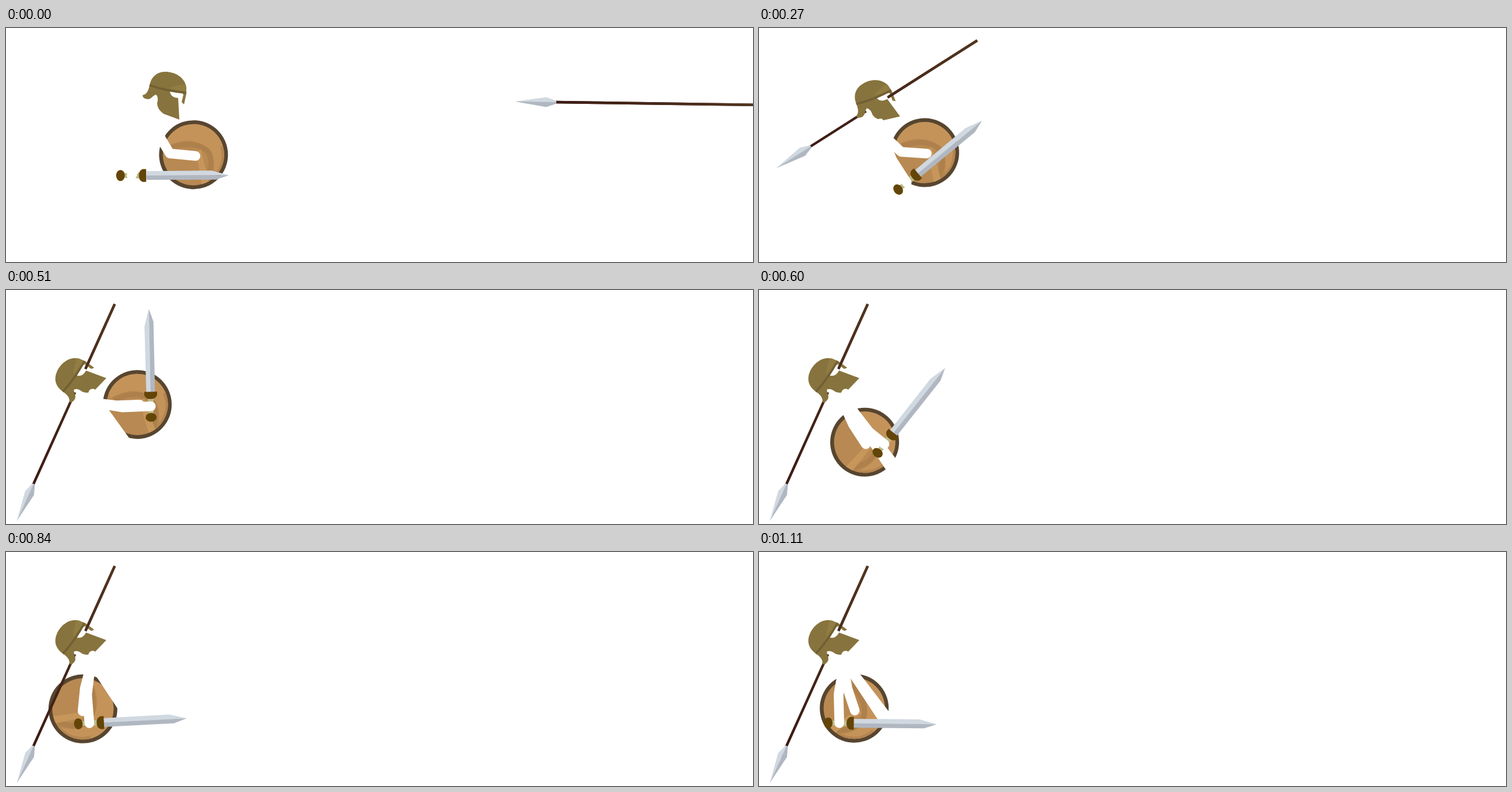
Recreate the animation shown at these times as an HTML page with a canvas. Size 1280x401 px, loop 1.14 s.

```html
<!DOCTYPE html>
<html lang="en">
<head>
<meta charset="utf-8">
<title>Spear</title>
<style>
  html, body { margin: 0; width: 100%; height: 100%; overflow: hidden; background: #fff; }
  canvas { display: block; }
</style>
</head>
<body>
<canvas id="stage" width="1280" height="401"></canvas>
<script>
const ctx = document.getElementById('stage').getContext('2d');
const LOOP = 1140, STEP = 30;
const HIT = 120, FALLEN = 420, SETTLED = 540;
const RAD = Math.PI / 180;

const mix = (a, b, u) => a + (b - a) * u;
const progress = (t, from, to) => Math.min(1, Math.max(0, (t - from) / (to - from)));

// Pendulum: eases through its turning points.
function swing(t, times, angles) {
  return angles.reduce((angle, next, i) => {
    const u = i ? progress(t, times[i - 1], times[i]) : 1;
    return mix(angle, next, (1 - Math.cos(Math.PI * u)) / 2);
  });
}

const polar = (from, degrees, length) => ({
  x: from.x + length * Math.cos(degrees * RAD),
  y: from.y + length * Math.sin(degrees * RAD)
});

function fill(path, color) {
  ctx.fillStyle = color;
  ctx.fill(new Path2D(path));
}

function stroke(path, color, width) {
  ctx.strokeStyle = color;
  ctx.lineWidth = width;
  ctx.stroke(new Path2D(path));
}

function oval(x, y, rx, ry, color) {
  ctx.fillStyle = color;
  ctx.beginPath();
  ctx.ellipse(x, y, rx, ry, 0, 0, 2 * Math.PI);
  ctx.fill();
}

function placed(x, y, degrees, draw) {
  ctx.save();
  ctx.translate(x, y);
  ctx.rotate(degrees * RAD);
  draw();
  ctx.restore();
}

function drawArm(from, to, bend) {
  const dx = to.x - from.x, dy = to.y - from.y, length = Math.hypot(dx, dy);
  const elbowX = (from.x + to.x) / 2 - dy / length * bend;
  const elbowY = (from.y + to.y) / 2 + dx / length * bend;
  ctx.lineCap = ctx.lineJoin = 'round';
  stroke(`M${from.x},${from.y} L${elbowX},${elbowY} L${to.x},${to.y}`, '#fff', 16.5);
  ctx.lineCap = 'butt';
}

function drawShield() {
  oval(0, 0, 59, 59, '#57452f');
  oval(0, 0, 52.5, 52.5, '#b88952');
  ctx.save();
  ctx.beginPath();
  ctx.arc(0, 0, 52.5, 0, 2 * Math.PI);
  ctx.clip();
  fill('M-46,-12 Q-8,-34 22,-14 Q46,6 32,50 L60,50 V-60 H-60Z', '#c4935a');
  stroke('M49,-19 A52,52 0 0 1 20,50', '#b48550', 10);
  stroke('M-40,-9 Q0,-26 24,-8 Q36,8 27,40', '#ae804b', 9);
  fill('M4,-6 L12,-10 L30,45 L18,50Z', '#c7965b');
  ctx.restore();
}

function drawSword() {
  fill('M-13,-4 L13,-5 V5 L-13,4Z', '#bdbb88');
  oval(-19, 0, 7.5, 9.5, '#644508');
  fill('M25,-11 H19 Q12,-8 12.5,0 Q12,8 19,11 H25Z', '#644508');
  fill('M25,-7.5 L137,-8.5 L167,-.5 L25,.5Z', '#d0d8e0');
  fill('M25,0 L167,-.5 L145,7 L25,7.5Z', '#b0b7c1');
}

function drawSpear() {
  const wood = ctx.createLinearGradient(69, 0, 408, 0);
  wood.addColorStop(0, '#3c1b14');
  wood.addColorStop(1, '#513520');
  ctx.fillStyle = wood;
  ctx.fillRect(68, -2.2, 340, 4.4);
  fill('M0,0 L53,-8 L70,-2 V.5Z', '#d0d8e0');
  fill('M0,0 H70 V2.5 L53,8.5Z', '#b0b7c1');
}

function drawHelmet() {
  oval(275, 116, 22, 19, '#fff');
  fill('M246,98 C249,83 259,75 273,75 C289,75 306,84 309,101 L309,113 L305,131 L301,127 ' +
       'L304,114 Q302,110 281,109 Q282,119 295,120 L297,157 L270,147 Q259,139 259,129 ' +
       'Q262,119 257,114 C251,116 249,122 243,122 Q234,121 234,115 Q243,114 246,98Z', '#87733d');
  fill('M279,103 Q290,98 308,97 L309,111Z', '#917c42');
  stroke('M246,98 Q274,108 309,111', '#725f33', 3.6);
}

function drawHead(t, fall) {
  // How far the tip has passed the eye: flight, quick piercing, slow slide.
  const depth = 574 * (progress(t, 0, HIT) - 1) + 168 * Math.min(1, 2 * fall) + 120 * fall;
  const spear = () => placed(299, 118, 0.8, () => {
    ctx.translate(-depth, 0);
    drawSpear();
  });
  placed(271 - 148 * fall, 115 + 20 * fall + 23 * fall ** 2, -66.5 * fall, () => {
    ctx.translate(-271, -115);
    spear();
    drawHelmet();
    oval(264, 146, 7.5 * Math.sqrt(fall), 7.5 * Math.sqrt(fall), '#fff');
    // Only the part in front of the eye passes over the helmet.
    ctx.beginPath();
    ctx.rect(299, -400, 1400, 1200);
    ctx.clip();
    spear();
  });
}

function drawScene(t) {
  ctx.fillStyle = '#fff';
  ctx.fillRect(0, 0, 1280, 401);

  const fall = progress(t, HIT, FALLEN), settle = progress(t, FALLEN, SETTLED);
  const flung = (from, to, power) => mix(from, to, fall ** power);
  const shieldTimes = [460, 735, 960, 1200], swordTimes = [460, 765, 925, 1160];
  const thrown = t < FALLEN;

  const shieldAngle = thrown ? flung(32.4, -8.3, 2.2) : swing(t, shieldTimes, [-8.3, 127, 67, 80]);
  const armAngle = thrown ? flung(119.5, -3.5, 1.13) : swing(t, swordTimes, [-3.5, 107, 72, 97]);
  const swordTilt = thrown ? flung(0, -98, 1.32) : swing(t, swordTimes, [-98, 9, -17, 3]);

  const shoulder = { x: 258 - 93 * fall - 20 * settle, y: 177 + 10 * fall + 8 * settle };
  const hip = mix(180, 249, fall);
  const bend = 3 + 17 * Math.sqrt(1 - fall);
  const reach = 75 + 4 * Math.sin(Math.PI * fall);
  const shield = polar(shoulder, shieldAngle, reach);
  const swordHand = polar(shoulder, armAngle, mix(87, 98.5, fall));

  placed(shield.x, shield.y, shieldAngle - bend * 1.4, drawShield);
  fill(`M${shoulder.x + 18},${shoulder.y + 1} L${hip + 17},330 H${hip - 17} ` +
       `L${shoulder.x + 1},${shoulder.y + 5}Z`, '#fff');
  drawArm(shoulder, polar(shoulder, shieldAngle, reach + 4), bend);
  placed(swordHand.x, swordHand.y, swordTilt, drawSword);
  drawArm(shoulder, swordHand, 5);
  drawHead(t, fall);
}

function tick() {
  drawScene(Math.floor(performance.now() % LOOP / STEP) * STEP);
  requestAnimationFrame(tick);
}
tick();
</script>
</body>
</html>
```
